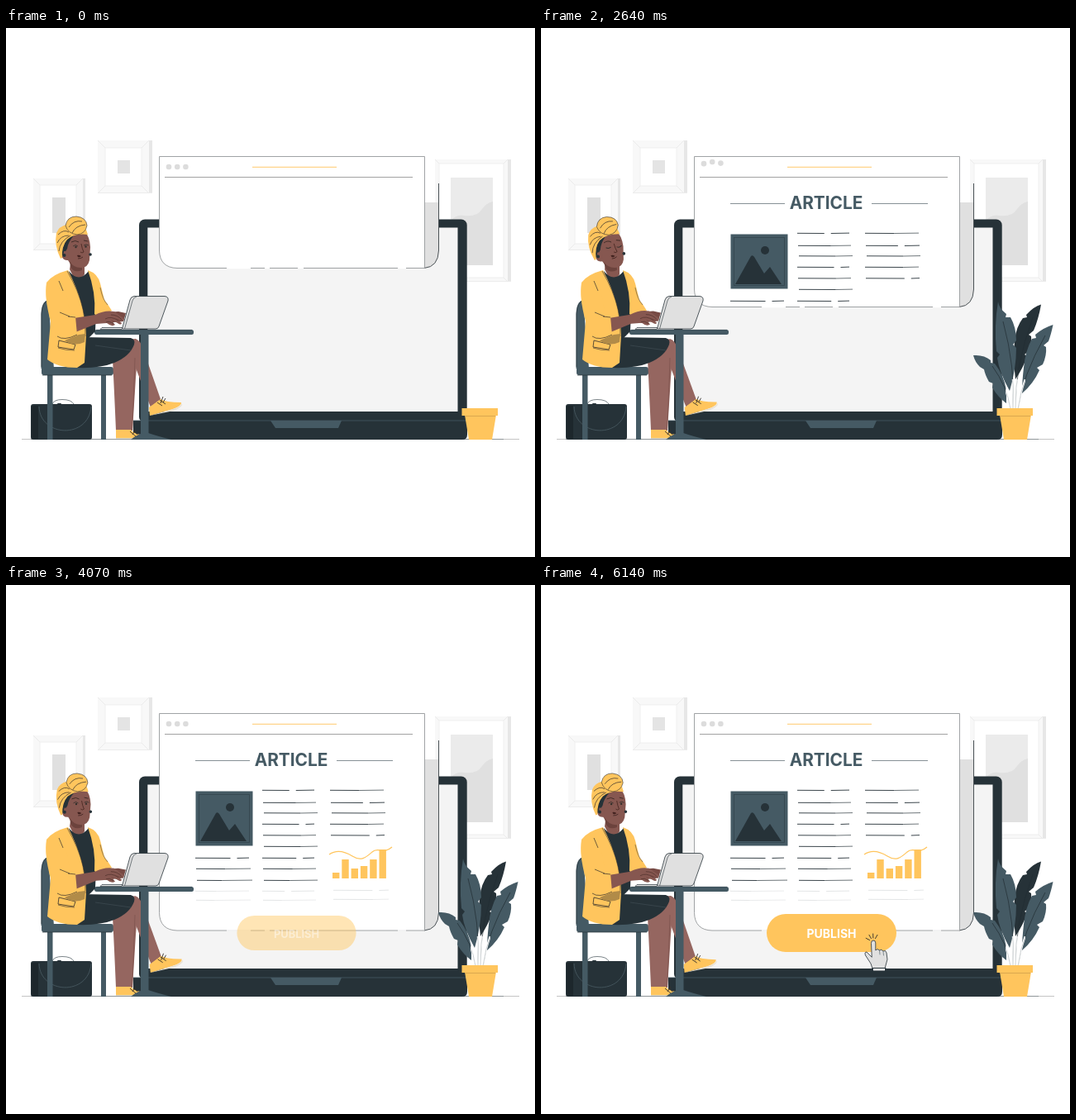
These frames come from a looping animation (640 by 640 pixels, 6210 ms). An HTML page with a canvas:

```html
<!DOCTYPE html>
<html lang="en">
<head>
<meta charset="utf-8">
<title>Publish article</title>
<style>
html, body { margin: 0; width: 100%; height: 100%; overflow: hidden; background: #fff; }
canvas { display: block; width: 640px; height: 640px; }
</style>
</head>
<body>
<canvas id="stage" width="640" height="640"></canvas>
<script>
const ctx = document.getElementById('stage').getContext('2d');
const LOOP = 6210;
const YELLOW = '#ffc55d', DARK = '#263238', SLATE = '#455a64', GREY = '#e0e0e0';
const SKIN = '#865750', LEG = '#956660', INK = '#33302c';

const clamp = v => Math.max(0, Math.min(1, v));
const ramp = (t, a, b) => clamp((t - a) / (b - a));
const ease = v => v * v * (3 - 2 * v);
const smooth = (t, a, b) => ease(ramp(t, a, b));

// Smooth interpolation through [time, value] pairs
function track(t, keys) {
  for (let i = 1; i < keys.length; i++) {
    const [a, u] = keys[i - 1], [b, v] = keys[i];
    if (t <= b) return u + (v - u) * smooth(t, a, b);
  }
  return keys[keys.length - 1][1];
}

function shape(d, fill, stroke, width = 1) {
  const p = new Path2D(d);
  if (fill) { ctx.fillStyle = fill; ctx.fill(p); }
  if (stroke) { ctx.strokeStyle = stroke; ctx.lineWidth = width; ctx.stroke(p); }
}
function rect(x, y, w, h, fill) { ctx.fillStyle = fill; ctx.fillRect(x, y, w, h); }
function round(x, y, w, h, r, fill) {
  ctx.beginPath(); ctx.roundRect(x, y, w, h, r);
  ctx.fillStyle = fill; ctx.fill();
}
function dot(x, y, r, fill) {
  ctx.beginPath(); ctx.arc(x, y, r, 0, 7);
  ctx.fillStyle = fill; ctx.fill();
}
function line(x1, y1, x2, y2, color, width = 1) {
  ctx.beginPath(); ctx.moveTo(x1, y1); ctx.lineTo(x2, y2);
  ctx.strokeStyle = color; ctx.lineWidth = width; ctx.stroke();
}
function group(draw) { ctx.save(); draw(); ctx.restore(); }
function turn(x, y, angle) { ctx.translate(x, y); ctx.rotate(angle); ctx.translate(-x, -y); }

function picture(x, y, w, h, rim, side) {
  rect(x, y, w, h, '#f8f8f8');
  rect(x + w - side, y, side, h, '#e7e7e7');
  rect(x, y + h - 1, w, 1, '#ececec');
  const iw = w - side;
  rect(x + rim, y + rim, iw - 2 * rim, h - 2 * rim, '#fff');
  ctx.strokeStyle = '#efefef'; ctx.lineWidth = 1;
  ctx.strokeRect(x + rim, y + rim, iw - 2 * rim, h - 2 * rim);
  for (const [a, b, s, u] of [[x, y, 1, 1], [x + iw, y, -1, 1], [x, y + h, 1, -1], [x + iw, y + h, -1, -1]])
    line(a, b, a + s * rim, b + u * rim, '#ebebeb');
}

function wall() {
  picture(33, 182, 63, 87, 8, 3);
  rect(56, 205, 16, 43, GREY);
  picture(111, 136, 66, 64, 9, 4);
  rect(135, 160, 15, 16, '#e4e4e4');
  picture(519, 159, 92, 148, 5, 4);
  rect(538, 181, 51, 106, '#ebebeb');
  shape('M538 233Q546 225 554 227Q570 229 576 219Q582 211 589 210V287H538Z', GREY);
  line(19, 497.5, 621, 497.5, '#c4c4c4');
  line(30, 497.5, 200, 497.5, '#8f9598');
  line(553, 497.5, 602, 497.5, '#8f9598');
}

function bigLaptop() {
  round(161, 231.5, 396.7, 246, 7, DARK);
  rect(171.3, 241.5, 375.2, 222.5, '#f4f4f4');
  shape('M154 475H558V492Q558 498 552 498H154Z', DARK);
  line(154, 475, 558, 475, SLATE, 0.8);
  shape('M320 475H406L402 484H326Z', SLATE);
}

// Rule of text, dark and then lighter, with a gap on some rows
function textRow(x1, x2, y, seed, alpha) {
  if (alpha <= 0) return;
  const split = 0.32 + 0.4 * (Math.sin(seed * 12.7) * 0.5 + 0.5);
  const mid = x1 + (x2 - x1) * split;
  ctx.globalAlpha = alpha;
  line(x1, y + 0.3, mid, y + 0.5, DARK, 0.9);
  if (seed % 3) ctx.globalAlpha = alpha * 0.75;
  line(seed % 3 ? mid : mid + 8, y + 0.5, x2, y + 0.1, DARK, 0.9);
  ctx.globalAlpha = 1;
}

const ROWS = [248, 263, 275.5, 289, 302.5, 316, 330, 343, 357, 370, 381];

function rows(t) {
  ROWS.forEach((y, i) => {
    const start = i < 7 ? 1570 + 140 * i : 2940 + 130 * (i - 7);
    const strength = i > 8 ? 0.14 : 1;
    const wob = i % 3;
    const a = ramp(t, start, start + 170) * strength;
    textRow(310 + wob, 373 + wob * 2, y, i * 3 + (i % 3 ? 1 : 0), a);
    if (i > 5) textRow(229 + wob, 294 + wob * 2, y, i * 3 + (i === 6 ? 0 : 2), a);
    const b = ramp(t, start + 90, start + 260) * strength;
    if (i < 5) textRow(392 + wob, 457 + wob, y, i * 3 + (i === 1 || i === 4 ? 0 : 1), b);
    if (i > 8) textRow(396, 463, y - 1, i, b);
  });
}

function title(t) {
  const grow = smooth(t, 80, 560);
  if (grow > 0) {
    line(295 - 66 * grow, 212.5, 295, 212.5, '#879196');
    line(400, 212.5, 400 + 68 * grow, 212.5, '#879196');
  }
  ctx.font = '700 20.8px Montserrat, Inter, "Open Sans", sans-serif';
  ctx.textAlign = 'left';
  ctx.fillStyle = SLATE;
  const word = 'ARTICLE';
  const x0 = 345 - ctx.measureText(word).width / 2;
  for (let i = 0; i < word.length; i++) {
    ctx.globalAlpha = ramp(t, 385 + i * 110, 535 + i * 110);
    ctx.fillText(word[i], x0 + ctx.measureText(word.slice(0, i)).width, 219);
  }
  ctx.globalAlpha = 1;
}

function image(t, bottom) {
  const a = ramp(t, 1440, 1890);
  if (!a) return;
  group(() => {
    ctx.beginPath(); ctx.rect(229, 249, 70, Math.max(0, Math.min(67, bottom - 268))); ctx.clip();
    rect(229.5, 249.5, 69, 66, SLATE);
    ctx.strokeStyle = '#33454e'; ctx.lineWidth = 0.8;
    ctx.strokeRect(233.5, 253.5, 61, 58);
    dot(271, 269, 5, DARK);
    shape('M235 310L254 276Q256 274 258 277L270 297L277 289L291 310Z', DARK);
    rect(229, 249, 70, 67, `rgba(255,255,255,${1 - a})`);
  });
}

function chart(t) {
  [7, 23, 12, 15, 23, 35].forEach((h, i) => {
    const v = h * smooth(t, 3150 + i * 50, 3400 + i * 50);
    rect(395 + i * 11.3, 355 - v, 8.4, v, YELLOW);
  });
  const p = ramp(t, 3500, 3900);
  if (p) group(() => {
    ctx.beginPath(); ctx.rect(390, 310, 78 * p, 30); ctx.clip();
    shape('M391 326C401 319 411 323 419 328C430 335 436 329 443 323C450 316 456 327 467 317', null, YELLOW, 1.2);
  });
}

function page(t) {
  const b = 291 + 47 * smooth(t, 1360, 2020) + 80.5 * smooth(t, 2750, 3500);
  shape(`M506 211H523.5V${b - 22}Q523 ${b - 2} 506 ${b - 0.5}Z`, GREY);
  shape(`M523.5 188V${b - 22}Q523 ${b - 2} 506 ${b - 0.5}`, null, '#4b5256');
  shape(`M185.5 155.5H506.5V${b - 0.5}H207Q186 ${b - 1} 185.5 ${b - 22}Z`, '#fff', '#96999b', 0.9);
  const y = b - 0.5;
  for (const [x1, x2] of [[267, 296], [313, 319], [353, 360], [474, 484]])
    line(x1, y, x2, y, '#fff', 1.5);

  const phase = t % (LOOP / 3);
  for (let i = 0; i < 3; i++) {
    const s = (phase - 330 - 80 * i) / 310;
    const up = s > 0 && s < 2 ? 6 * Math.sin((s % 1) * Math.PI) : 0;
    dot(197 + 10.2 * i, 168 - up, 3.3, '#dcdcdc');
  }
  line(192, 180.5, 492, 180.5, '#a2a2a2');
  line(298, 168.3, 400, 168.3, YELLOW, 0.9);
  title(t);
  image(t, b);
  rows(t);
  chart(t);
}

function button(t) {
  const p = smooth(t, 3930, 4230);
  if (p) group(() => {
    ctx.globalAlpha = p;
    ctx.translate(351.5, 421); ctx.scale(0.85 + 0.15 * p, 0.85 + 0.15 * p);
    round(-78.5, -23, 157, 46, 23, YELLOW);
    ctx.font = '700 14px Montserrat, Inter, "Open Sans", sans-serif';
    ctx.textAlign = 'center';
    ctx.fillStyle = '#fff';
    ctx.fillText('PUBLISH', 0, 6);
  });
  const q = ramp(t, 4230, 4450);
  if (q) group(() => {
    ctx.globalAlpha = q;
    const press = 0.5 - 0.5 * Math.cos((t - 4570) / 785 * Math.PI * 2);
    ctx.translate(0.8 * press, -1.8 * press);
    ctx.lineJoin = ctx.lineCap = 'round';
    shape('M399.5 433Q399.5 430 402 430Q404.8 430 404.8 433V442Q407 439 409.5 442Q412 440 414 443Q417 441 418 445L419 453L416 464H401L399 458L392.5 448Q391 444 394 444L400 450Z', GREY, '#3d464a', 0.9);
    line(409.5, 442, 410, 447, '#68757b', 0.8);
    line(414, 443, 414.5, 448, '#68757b', 0.8);
    round(400, 463, 18, 5, 2, DARK);
    rect(402, 464, 14, 2.5, '#fafafa');
    for (const a of [-2.65, -2.1, -1.6, -1.05])
      line(402 + Math.cos(a) * 5, 432 + Math.sin(a) * 5,
        402 + Math.cos(a) * 10, 432 + Math.sin(a) * 10, INK, 0.9);
  });
}

function plant(t) {
  const top = 460 - 129 * ramp(t, 0, 1480);
  group(() => {
    ctx.beginPath(); ctx.rect(515, top, 120, 470 - top); ctx.clip();
    const stems = ['M568 461Q564 434 546 409', 'M571 461Q574 410 559 355', 'M574 461Q573 410 595 350', 'M577 461Q582 422 610 372'];
    shape('M605 334.5Q596 337 587 347L588 350L583 351Q575 361 573 378Q571 400 574 425Q584 410 588 397L585 395L590 391Q594 380 593 373L590 371L596 366Q602 352 605 334.5Z', DARK);
    shape('M553 331Q554 339 563 346L562 350L568 350Q575 362 575 378L571 383L575 387Q575 412 567 439Q554 416 552 399L555 395L551 391Q548 360 553 331Z', SLATE);
    shape('M619.5 359Q607 363 598 371L599 375L594 376Q586 390 584 411Q582 428 582 442Q596 430 603 414L600 411L607 407Q612 396 611 386L608 384L614 379Q617 371 619.5 359Z', SLATE);
    shape('M523 396Q536 395 544 402L544 405L549 406Q560 420 563 438L563 454Q553 447 546 435L547 430L542 428Q537 419 536 413L531 410Q525 404 523 396Z', SLATE);
    for (const s of stems) shape(s, null, '#222d33', 0.7);
    ctx.beginPath(); ctx.rect(562, 425, 24, 40); ctx.clip();
    for (const s of stems) { shape(s, null, '#fff', 2.2); shape(s, null, '#9ba4a8', 0.5); }
  });
  shape('M555 468H593L588 498H560Z', YELLOW);
  rect(551.5, 460, 43.5, 9, YELLOW);
  line(556, 469.5, 592, 469.5, '#c99c4b', 0.7);
}

function furniture() {
  round(30, 455, 74, 43, 3, DARK);
  rect(31, 457, 8, 40, '#1d272c');
  shape('M56 455Q58 449.5 68 449.5Q79 449.5 82 455', null, '#5b666b', 0.8);
  shape('M40 458C41 495 100 498 103 458', null, '#4b5c64', 0.8);
  round(62, 454, 5, 5, 1, DARK);
  shape('M42.5 412V346Q43 331 51 329L58 412Z', SLATE);
  shape('M43 410V346Q43.5 332 51 329.5', null, DARK, 0.7);
  round(43, 410, 87, 10, 3, SLATE);
  rect(50, 420, 6.5, 78, SLATE);
  rect(115, 420, 6, 78, SLATE);
  line(44, 420, 128, 420, DARK, 0.7);
}

function legs(t) {
  group(() => {
    turn(170, 405, 0.014 * Math.sin(t / 240));
    shape('M145 377L157 376Q162 378 165 386L187 449L175 459L155 406Z', LEG);
    shape('M173 459L187 449Q193 453 212 453Q213 457 202 461L174 469Z', YELLOW);
    shape('M174 469L202 461Q212 458 213 454Q215 458 203 463Z', '#e8e2d5');
    shape('M183 453L189 457M186 450L193 455M187 454L190 446M190 453L193 448', null, INK, 0.9);
  });
  shape('M129 401Q149 395 156 380Q160 394 157 423L153 487H133Q131 440 129 401Z', LEG);
  shape('M156 399Q155 440 152.5 487', null, '#764e49', 0.6);
  shape('M133 486H151Q155 491 163 492L162 497H133Z', YELLOW);
  line(133, 496.5, 162, 496.5, '#e7ddc7', 1);
  shape('M150 488L157 494M154 486L159 492M153 492L157 486', null, INK, 0.9);
}

function table() {
  rect(163, 370, 9.5, 122, SLATE);
  shape('M151 498Q158 492 166 490H172Q184 494 200 498Z', SLATE);
  round(107, 365, 120, 6, 2.5, SLATE);
  line(109, 365.3, 225, 365.3, '#384a53', 0.6);
}

function head(t) {
  const dx = track(t, [[0, 0], [250, 0], [1000, 7], [1300, 7], [1790, 3], [2400, -4], [2750, -5], [3710, 0], [4570, 2.5], [5200, 2.5], [6210, 1.2]]);
  shape('M79 280L95 284L95 298Q90 307 81 300L77 292Z', SKIN);
  group(() => {
    turn(88, 293, dx / 55);
    shape('M70 256Q78 247 95 247Q101 251 102 265L101 281Q99 290 91 290Q80 291 75 281Q68 282 67 273Z', SKIN);
    shape('M77 282Q82 291 92 290L92 293Q82 297 78 289Z', '#6c433d');
    shape('M67 277Q68 264 73 256Q77 252 82 251Q75 259 74 267L71 272Z', DARK);
    shape('M66 279Q58 263 61 248Q64 240 73 238Q91 236 97 244L99 250Q83 248 74 256Q67 264 68 278Z', YELLOW);
    shape('M72 239Q74 228 85 228Q97 229 98 239Q96 249 86 250Q75 249 72 239Z', YELLOW, INK, 0.6);
    shape('M76 241Q82 232 92 234M80 248Q84 239 96 238M63 250Q70 243 76 247M62 260Q66 251 76 251M64 270Q65 258 78 251', null, INK, 0.7);
    shape('M70 270Q76 269 76 276Q73 282 69 277Z', SKIN);
    dot(70.5, 275, 2, DARK);
    dot(102, 274, 1.8, DARK);
    const shut = (t > 940 && t < 1080) || (t > 2590 && t < 2720);
    if (shut) {
      shape('M81 265Q84 267 87 265M94 265Q97 267 100 264', null, INK, 1);
    } else {
      shape('M81 264Q84 261 87 264M94 263Q97 261 100 263', null, INK, 0.8);
      dot(84.5, 265, 1.2, INK); dot(96.5, 264.5, 1.2, INK);
    }
    shape('M79 259Q84 256 88 259M94 257L99 258', null, '#3b2924', 0.9);
    shape('M91 261Q92 267 94 271Q92 273 90 271', null, '#44251f', 0.8);
    shape('M86 275Q88 274 91 276Q89 278 87 277Z', '#42221f');
    shape('M87 279Q91 279 93 277', null, '#3a211e', 0.8);
  });
}

function body(t) {
  shape('M89 374L151 375Q157 377 155 383Q150 397 131 405Q114 412 86 411Z', DARK);
  line(108, 384, 151, 390, '#435158', 0.6);
  shape('M76 294Q88 309 100 294L107 304Q110 330 108 367L94 381L84 355Z', DARK);
  shape('M99 293Q111 297 114 309L119 329Q124 335 128 342L112 350L107 346Q109 320 99 293Z', YELLOW);
  shape('M75 293Q56 298 49 308Q46 326 54 355L50 401Q62 411 86 411L95 405L97 371Q96 333 75 293Z', YELLOW);
  shape('M74 294Q88 318 93 340Q97 356 96 373', null, INK, 0.6);
  shape('M114 314Q117 329 123 335', null, INK, 0.5);
  shape('M64 378L84 383L82 389L63 386Z', YELLOW, INK, 0.8);
  shape('M63 387Q72 390 83 390', null, INK, 0.6);

  group(() => {
    turn(90, 358, 0.012 * Math.sin(t / 110));
    shape('M111 350Q122 343 136 343L145 345L142 355L120 357Z', '#774a44');
    shape('M82 351L108 347Q119 341 131 343L142 351Q144 354 140 354L132 351L140 357Q139 360 135 357L127 353L132 359Q128 362 122 357L109 358L84 368Z', SKIN);
    shape('M120 352Q127 348 136 354M121 356Q125 354 130 358M127 347Q135 347 140 353', null, '#452a26', 0.6);
  });
  shape('M55 305Q46 312 50 335L60 371Q64 378 72 377L86 371L84 349L78 348L72 315Q67 303 55 305Z', YELLOW);
  shape('M64 306L69 318M77 349L65 344M84 350L75 349M62 373Q70 379 86 371', null, INK, 0.7);
  shape('M71 378L88 371L96 370L95 380Q82 386 71 378Z', '#b18b48');
}

function smallLaptop() {
  shape('M116 362.5H142L140 364.5H114Z', '#e7e7e7', DARK, 0.7);
  shape('M140.5 364L150 329Q151 325 155 324.5H192Q197 325 196 330L185 361Q184 364 181 364Z', GREY, DARK, 0.8);
  shape('M143.5 364L153 330Q154 326 158 325', null, '#555e63', 0.8);
}

function draw(t) {
  rect(0, 0, 640, 640, '#fff');
  wall();
  bigLaptop();
  page(t);
  button(t);
  plant(t);
  furniture();
  legs(t);
  table();
  head(t);
  body(t);
  smallLaptop();
}

const begin = performance.now();
function tick(now) {
  draw(Math.max(0, now - begin) % LOOP);
  requestAnimationFrame(tick);
}
draw(0);
requestAnimationFrame(tick);
</script>
</body>
</html>
```
